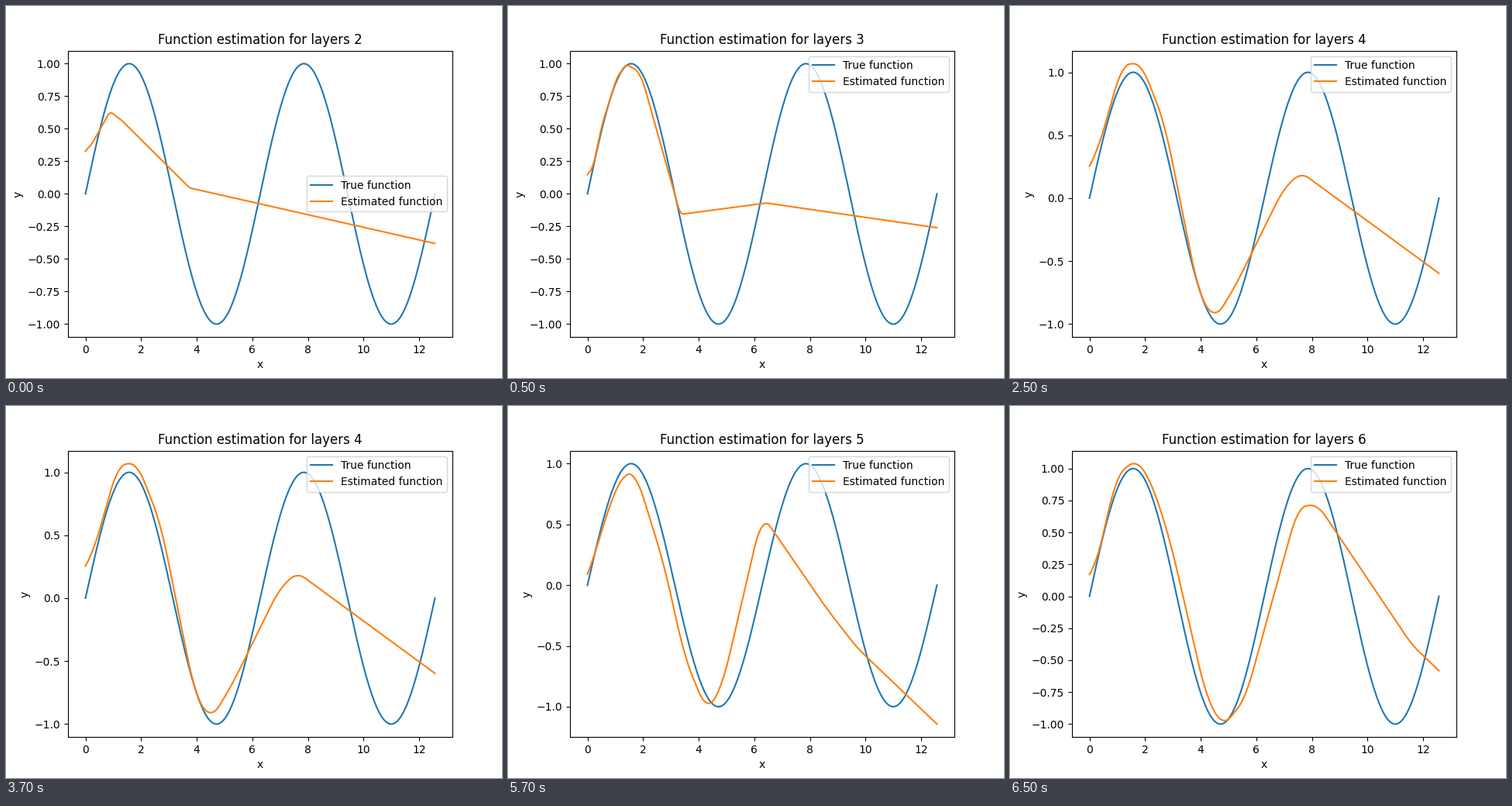
Recreate the animation shown at these times as a matplotlib script. Size 640 px wide and 480 px high, loop 8000 ms.

```python
import matplotlib.pyplot as plt
import numpy as np
from matplotlib.animation import FuncAnimation

STEP_MS = 500
END = 4 * np.pi

# Layer count, steps shown, corner rounding, corners of the estimate.
SCENES = [
    (2, 1, .2, [(0, .328), (.25, .39), (.88, .633), (1.3, .565),
                (3.74, .046), (END, -.381)]),
    (3, 4, .2, [(0, .148), (.2, .205), (.52, .53), (1.05, .89), (1.38, .995),
                (1.78, .95), (2, .862), (3.34, -.158), (6.42, -.07),
                (END, -.26)]),
    (4, 4, .6, [(0, .255), (.29, .37), (1.17, 1.06), (1.85, 1.075), (2.7, .6),
                (3.95, -.78), (4.53, -.96), (5.3, -.675), (6.95, .065),
                (7.6, .207), (END, -.597)]),
    (5, 4, .6, [(0, .09), (.3, .275), (.75, .635), (1.3, .925), (1.75, .915),
                (2.75, .175), (3.5, -.6), (4.3, -1.04), (4.85, -.83),
                (6.28, .58), (8.6, -.193), (9.7, -.517), (END, -1.143)]),
    (6, 3, .6, [(0, .165), (.2, .21), (.98, .95), (1.7, 1.073), (2.25, .88),
                (2.9, .44), (4.2, -.79), (4.8, -1.02), (5.6, -.805),
                (7.5, .7), (8.2, .72), (11.6, -.382), (END, -.582)]),
]
TIMELINE = [scene for scene in SCENES for _ in range(scene[1])]


def soft_ramp(u, width):
    """Ramp max(u, 0) with its corner rounded over the given width."""
    half = width / 2
    return np.clip(u + half, 0, width) ** 2 / (2 * width) + np.maximum(u - half, 0)


def estimate(x, corners, width):
    """Sum of soft ramps: straight pieces joined by rounded corners."""
    cx, cy = np.transpose(corners)
    slopes = np.diff(cy) / np.diff(cx)
    y = cy[0] + slopes[0] * x
    for corner, bend in zip(cx[1:-1], np.diff(slopes)):
        y += bend * soft_ramp(x - corner, width)
    return y


fig, ax = plt.subplots(figsize=(6.4, 4.8), dpi=100)
x = np.linspace(0, END, 1000)


def draw(step):
    layers, _, width, corners = TIMELINE[step]
    ax.clear()
    ax.plot(x, np.sin(x), label="True function")
    ax.plot(x, estimate(x, corners, width), label="Estimated function")
    ax.set(title=f"Function estimation for layers {layers}",
           xlabel="x", ylabel="y")
    ax.legend(loc="center right" if layers == 2 else "upper right")


anim = FuncAnimation(fig, draw, frames=len(TIMELINE), interval=STEP_MS,
                     repeat=True, repeat_delay=0)
plt.show()
```
